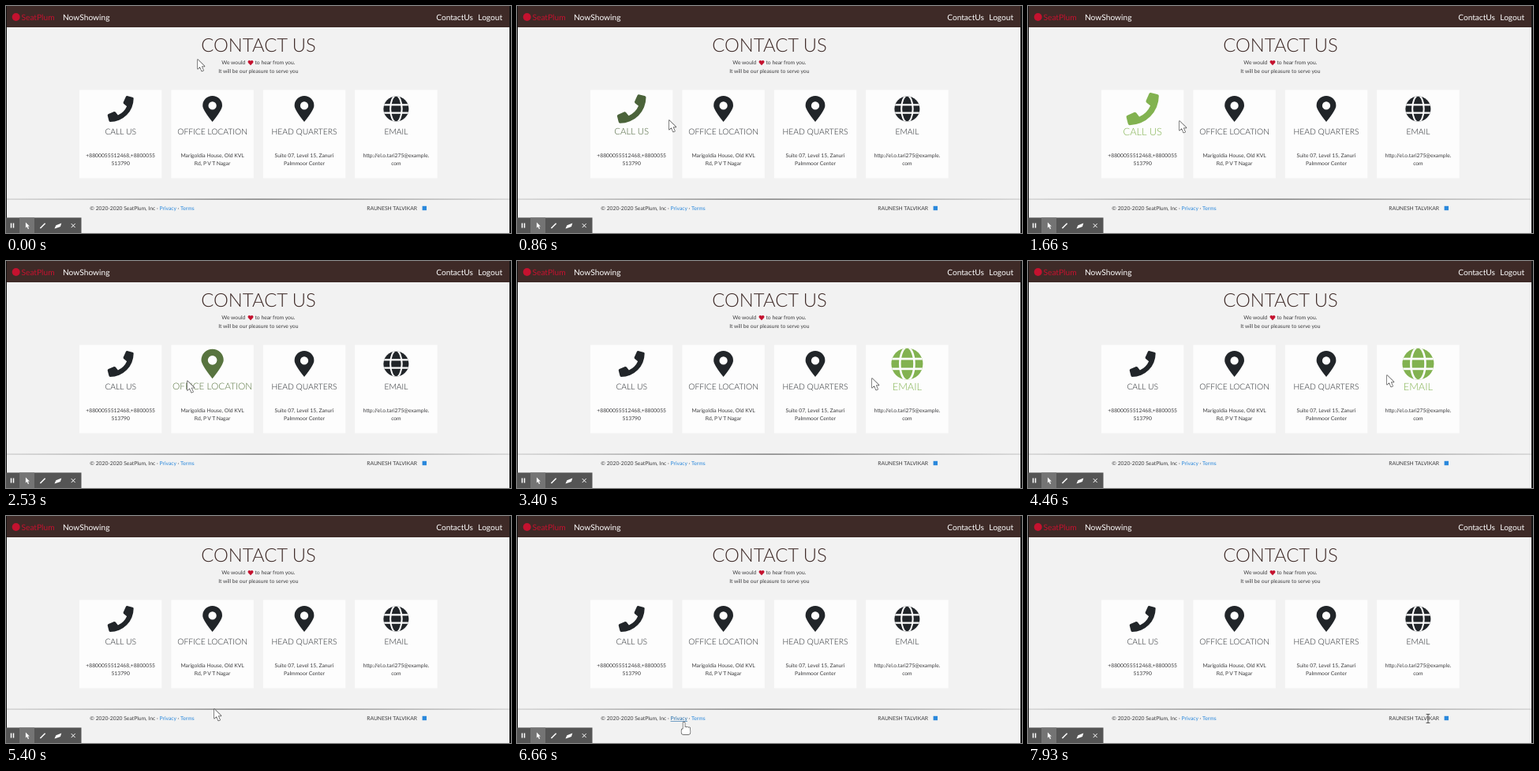
Write an HTML page with a canvas that moves like this. It is 640 by 288 pixels and loops after 8000 ms.

```html
<!DOCTYPE html>
<html lang="en">
<head>
<meta charset="utf-8">
<title>Contact us</title>
<style>
html, body { margin: 0; width: 100%; height: 100%; overflow: hidden; background: #f2f2f2; }
canvas { display: block; width: 100vw; height: 100vh; }
</style>
</head>
<body>
<canvas id="stage"></canvas>
<script>
const W = 640, H = 288, LOOP = 8000;
const canvas = document.getElementById('stage');
const ctx = canvas.getContext('2d');
const ratio = window.devicePixelRatio || 1;
canvas.width = W * ratio;
canvas.height = H * ratio;

const BROWN = '#3e2a27', INK = '#3c3c3e', LINK = '#2a88dc', RED = '#c4122f', PAPER = '#fdfdfd';
const DARK = [33, 37, 41], GREEN = [130, 178, 80];
const SMALL = 6.75, FOOT = 259;

// Icons are centred on 0,0 in a box two units high
const PHONE = new Path2D('M.5-1L.9-.9Q1-.88 1-.8A1.8 1.8 0 0 1-.8 1Q-.88 1-.9.9L-1 .5' +
  'Q-1 .43-.93.4L-.5.21Q-.44.2-.39.24L-.2.48Q.28.26.48-.2L.24-.39Q.2-.44.21-.5L.4-.93Q.43-1 .5-1Z');
const PIN = new Path2D('M0 1Q-.75.06-.75-.25A.75.75 0 0 1 .75-.25Q.75.06 0 1Z' +
  'M.31-.25A.31.31 0 0 0-.31-.25 .31.31 0 0 0 .31-.25Z');
const ARROW = new Path2D('M0 0V11.8L2.8 9.3 5.1 14.6 7.2 13.7 4.9 8.5H8.6Z');
const HEART = new Path2D('M0 3.3L-3.1 0A1.9 1.9 0 0 1 0-2.2 1.9 1.9 0 0 1 3.1 0Z');

const HAND = new Path2D();
HAND.roundRect(-3, 8, 11, 7, 2.5);
for (let i = 0; i < 4; i++) HAND.roundRect(-1 + 2.2 * i, i ? 5 + 0.4 * i : -0.5, 2.2, i ? 8 : 13, 1.1);

const fillIcon = path => () => ctx.fill(path, 'evenodd');

function globe() {
  ctx.beginPath();
  ctx.arc(0, 0, 0.97, 0, 7);
  ctx.fill();
  ctx.clip();
  ctx.strokeStyle = PAPER;
  ctx.lineWidth = 0.125;
  ctx.beginPath();
  for (const y of [-0.31, 0.31]) {
    ctx.moveTo(-1, y);
    ctx.lineTo(1, y);
  }
  ctx.moveTo(0.44, 0);
  ctx.ellipse(0, 0, 0.44, 1.02, 0, 0, 7);
  ctx.stroke();
}

const CARD = { y: 106.5, w: 104.4, h: 112 };
const cards = [
  { title: 'CALL US', icon: fillIcon(PHONE), lines: ['+8800055512468,+8800055', '513790'] },
  { title: 'OFFICE LOCATION', icon: fillIcon(PIN), lines: ['Marigoldia House, Old KVL', 'Rd, P V T Nagar'] },
  { title: 'HEAD QUARTERS', icon: fillIcon(PIN), lines: ['Suite 07, Level 15, Zanuri', 'Palmmoor Center'] },
  { title: 'EMAIL', icon: globe, lines: ['http://el.o.tari275@example.', 'com'] }
];
cards.forEach((card, i) => card.x = 93 + 116.4 * i);

const links = [
  { label: 'Privacy', x: 194.5, w: 21.5 },
  { label: 'Terms', x: 221, w: 18 }
];
const owner = { label: 'RAUNESH TALVIKAR', x: 457.2, w: 65 };

// Where the pointer rests, and when it gets there
const rests = [
  { t: 0, x: 243, y: 68 },
  { t: 900, x: 192, y: 146 },
  { t: 3300, x: 450, y: 149 },
  { t: 4200, x: 455, y: 145 },
  { t: 5400, x: 264, y: 245 },
  { t: 5950, x: 211.5, y: 262 },
  { t: 7800, x: 507, y: 257 }
];

// Longer moves take longer and sag a little on the way
function pointerAt(t) {
  const next = rests.findIndex(r => r.t > t);
  if (next < 1) return next ? rests[rests.length - 1] : rests[0];
  const a = rests[next - 1], b = rests[next];
  const dist = Math.hypot(b.x - a.x, b.y - a.y);
  const k = Math.max(0, 1 - (b.t - t) / (240 + 3 * dist));
  const e = k * k * (3 - 2 * k);
  return {
    x: a.x + (b.x - a.x) * e,
    y: a.y + (b.y - a.y) * e + 0.05 * dist * Math.sin(Math.PI * e)
  };
}

const inside = (p, x, y, w, h) => p.x >= x && p.x <= x + w && p.y >= y && p.y <= y + h;
const overLabel = (p, l) => inside(p, l.x, 250, l.w, 13);

// Share of the last 160 ms the pointer spent over the card
function hoverOf(card, t) {
  const n = 16;
  let hits = 0;
  for (let i = 0; i < n; i++) {
    if (inside(pointerAt(t - i * 10), card.x, CARD.y, CARD.w, CARD.h)) hits++;
  }
  return hits / n;
}

function text(str, x, y, size, color, align = 'left', weight = 400) {
  ctx.font = `${weight} ${size}px Lato, "Open Sans", sans-serif`;
  ctx.textAlign = align;
  ctx.fillStyle = color;
  ctx.fillText(str, x, y);
}

function rect(x, y, w, h, color) {
  ctx.fillStyle = color;
  ctx.fillRect(x, y, w, h);
}

function at(x, y, scale, draw) {
  ctx.save();
  ctx.translate(x, y);
  ctx.scale(scale, scale);
  draw();
  ctx.restore();
}

function stroke(path, color, width) {
  ctx.strokeStyle = color;
  ctx.lineWidth = width;
  ctx.stroke(path);
}

function fill(path, color) {
  ctx.fillStyle = color;
  ctx.fill(path);
}

function header() {
  rect(0, 0, W, 27, BROWN);
  ctx.fillStyle = RED;
  ctx.beginPath();
  ctx.arc(12.7, 14, 5, 0, 7);
  ctx.fill();
  text('SeatPlum', 19.5, 17.8, 10.2, RED);
  text('NowShowing', 72, 17.8, 10.2, '#fff');
  text('ContactUs', 545.3, 17.8, 10.1, '#fff');
  text('Logout', 629, 17.8, 10.1, '#fff', 'right');
}

function intro() {
  text('CONTACT US', 320, 58.3, 23.8, BROWN, 'center', 300);
  text('We would', 273.3, 74.3, SMALL, INK);
  text('to hear from you.', 366.3, 74.3, SMALL, INK, 'right');
  at(310, 72, 1, () => fill(HEART, RED));
  text('It will be our pleasure to serve you', 319.8, 84.6, SMALL, INK, 'center');
}

function drawCard(card, t) {
  const h = hoverOf(card, t), scale = 1 + 0.25 * h;
  const color = `rgb(${DARK.map((c, i) => Math.round(c + (GREEN[i] - c) * h))})`;
  const cx = card.x + CARD.w / 2;
  rect(card.x, CARD.y, CARD.w, CARD.h, PAPER);
  at(cx, 130.5, 16.5 * scale, () => {
    ctx.fillStyle = color;
    card.icon();
  });
  at(cx, 159, scale, () => text(card.title, 0, 3.7, 10.3, color, 'center', 300));
  card.lines.forEach((s, i) => text(s, cx, 191.7 + i * 9.9, SMALL, INK, 'center'));
}

function footer(p) {
  const g = ctx.createLinearGradient(0, 0, W, 0);
  g.addColorStop(0, '#c4c4c4');
  g.addColorStop(0.5, '#484848');
  g.addColorStop(1, '#c4c4c4');
  rect(0, 244.6, W, 1, g);
  text('© 2020-2020 SeatPlum, Inc', 106.3, FOOT, SMALL, INK);
  for (const l of links) {
    const over = overLabel(p, l), color = over ? '#1d68a7' : LINK;
    text('·', l.x - 3.4, FOOT, SMALL, INK);
    text(l.label, l.x, FOOT, SMALL, color);
    if (over) rect(l.x, FOOT + 1, l.w, 0.6, color);
  }
  text(owner.label, owner.x, FOOT, SMALL, INK);
  rect(527.6, 253.8, 5.4, 5.4, LINK);
}

function toolbar() {
  const tools = [
    () => stroke(new Path2D('M-1.5-3V3M1.5-3V3'), '#fff', 1.5),
    () => at(-2.4, -4, 0.58, () => fill(ARROW, '#fff')),
    () => stroke(new Path2D('M-3.2 3.4L3-2.8'), '#fff', 1.6),
    () => fill(new Path2D('M-4.4 3.8L-2.6-.4 4.4-3.2 3 1.4Z'), '#fff'),
    () => stroke(new Path2D('M-2.5-2.5L2.5 2.5M2.5-2.5L-2.5 2.5'), '#fff', 1)
  ];
  rect(0, 268.5, 95.5, 19.5, '#555');
  rect(17, 268.5, 19, 19.5, '#747474');
  tools.forEach((draw, i) => at(8 + 19.3 * i, 278.6, 1, draw));
}

function pointer(p) {
  at(p.x, p.y, 1, () => {
    ctx.lineJoin = 'round';
    if (overLabel(p, owner)) {
      stroke(new Path2D('M-2.4-5.5H2.4M0-5.5V5.5M-2.4 5.5H2.4'), '#444', 0.9);
      return;
    }
    const shape = links.some(l => overLabel(p, l)) ? HAND : ARROW;
    stroke(shape, '#484848', 1.3);
    fill(shape, '#fff');
  });
}

function render(t) {
  const p = pointerAt(t);
  ctx.setTransform(ratio, 0, 0, ratio, 0, 0);
  ctx.textRendering = 'geometricPrecision';
  rect(0, 0, W, H, '#f2f2f2');
  header();
  intro();
  cards.forEach(c => drawCard(c, t));
  footer(p);
  rect(0, 0, 1, H, '#111');
  rect(W - 2, 0, 2, H, '#111');
  toolbar();
  pointer(p);
}

const start = performance.now();
function tick() {
  render((performance.now() - start) % LOOP);
  requestAnimationFrame(tick);
}
tick();
</script>
</body>
</html>
```
